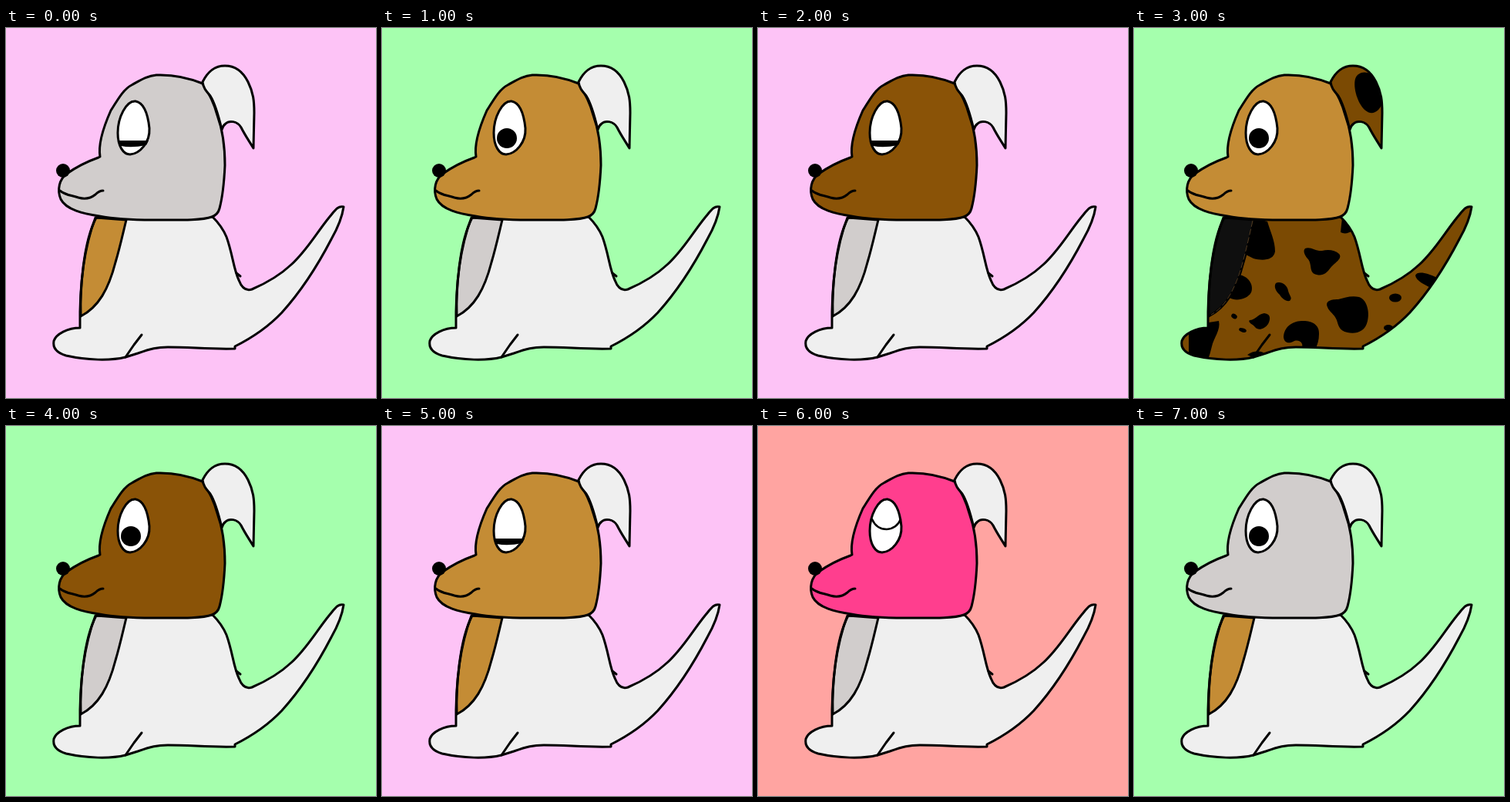
An HTML page for the animation above (8 s loop, 480 px wide and 480 px high).

```html
<!DOCTYPE html>
<html lang="en">
<head>
<meta charset="utf-8">
<title>Dog</title>
<style>
  html, body { margin: 0; width: 100%; height: 100%; overflow: hidden; }
  svg { display: block; width: 100vw; height: 100vh; }
  .line { fill: none; stroke: #000; stroke-width: 3; stroke-linecap: round; stroke-linejoin: round; }
</style>
</head>
<body>
<svg viewBox="0 0 480 480">
  <defs>
    <path id="bodyShape" d="M116 246C103 280 95 325 96 389C80 389 65 397 62 406C60 417 68 422 78 425C105 431 135 432 155 427L171 422C188 416 196 414 210 414C240 414 265 417 297 416L297 413C319 402 341 387 358 369C385 339 408 301 422 274C430 260 436 246 438 232C430 230 426 238 419 246C402 267 390 289 370 307C354 322 333 333 319 339C310 342 305 335 302 327C295 312 294 293 286 271C281 259 275 252 268 245Z"/>
    <path id="earShape" d="M255 70C261 58 269 49 284 49C299 49 308 58 314 70C321 84 322 95 322 110L321 156C315 146 310 139 305 129C300 120 289 120 285 124Q281 127 280 132C276 115 272 99 265 88C260 82 256 78 255 70Z"/>
    <clipPath id="bodyClip"><use href="#bodyShape"/></clipPath>
    <clipPath id="earClip"><use href="#earShape"/></clipPath>
  </defs>

  <rect id="back" width="480" height="480"/>

  <use id="body" href="#bodyShape"/>
  <g class="spots" clip-path="url(#bodyClip)">
    <path d="M150 245L173 251C177 265 183 276 183 290C181 302 166 302 155 299L141 292Z"/>
    <path d="M222 286C229 283 236 290 244 289C252 287 261 288 266 293C271 299 261 304 255 311C250 318 245 322 237 320C226 318 232 306 225 299C221 294 219 289 222 286Z"/>
    <path d="M251 362C247 353 258 352 265 352C274 350 281 347 292 349C302 352 306 368 303 380C300 395 287 397 277 395C266 393 265 385 263 379C260 371 253 368 251 362Z"/>
    <path d="M184 331C190 328 199 333 200 341C202 348 206 350 202 354C197 355 192 351 189 346C184 342 181 335 184 331Z"/>
    <path d="M135 320C147 321 156 332 152 343C147 352 132 355 124 350Z"/>
    <path d="M150 379C157 379 161 371 169 370C178 371 177 378 174 384C169 391 161 393 157 388C154 384 147 382 150 379Z"/>
    <path d="M194 401C195 387 205 381 217 380C229 379 241 384 240 397C240 405 238 411 235 417H217C221 410 216 404 208 406C201 410 195 409 194 401Z"/>
    <path d="M71 386L110 380C113 391 103 403 101 413Q99 422 96 430L71 424Z"/>
    <path d="M268 265L270 246L285 262Q275 269 268 265Z"/>
    <path d="M365 321C367 315 380 317 393 324L385 337C377 333 366 328 365 321Z"/>
    <ellipse cx="339" cy="350" rx="8" ry="5.5"/>
    <ellipse cx="330" cy="389" rx="6" ry="4"/>
    <ellipse cx="130" cy="374" rx="4" ry="3" transform="rotate(35 130 374)"/>
    <ellipse cx="141" cy="392" rx="5" ry="2.5" transform="rotate(18 141 392)"/>
    <path d="M147 424Q157 417 168 421L160 430Z"/>
  </g>
  <path id="bib" class="line" d="M117 246L156 249C152 265 148 284 142 304C133 339 120 362 97 374C96 340 100 278 117 246Z"/>
  <path class="spots" d="M154 250C150 268 146 286 141 304C132 338 119 361 100 372" fill="none" stroke="#654a29" stroke-width=".8" stroke-dasharray="8 3"/>
  <use href="#bodyShape" class="line"/>
  <path class="line" d="M155 427L166 411L176 398M299 318L304 322" stroke-width="2"/>

  <path id="head" class="line" d="M122 167C119 149 128 125 136 107C146 91 153 79 163 74C174 68 183 62 195 61C220 60 238 65 255 72C263 84 270 98 274 113C281 132 284 155 284 178C283 200 281 219 277 234Q275 242 267 245C254 250 220 249 190 249C163 249 137 247 121 244C101 241 78 236 71 222C66 210 69 196 79 189C93 179 106 173 120 168Z"/>
  <path class="line" d="M70 211C77 217 85 217 94 220C104 223 111 220 116 216Q121 211 126 211"/>
  <circle cx="74" cy="185" r="9"/>

  <use id="ear" href="#earShape"/>
  <path class="spots" clip-path="url(#earClip)" d="M287 66C290 57 301 55 308 61L318 76L322 98C317 110 308 114 299 106C290 97 284 78 287 66Z"/>
  <use href="#earShape" class="line"/>

  <path class="line" style="fill:#fff" d="M168 95C156 94 145 116 145 136C145 153 152 164 161 164C174 163 187 148 186 130C184 111 179 97 168 95Z"/>
  <circle id="openEye" cx="162" cy="143" r="13"/>
  <path id="sleepyEye" d="M146 146H185L182 152Q163 156 149 153Z"/>
  <path id="liftedLid" class="line" style="stroke-width:2.5" d="M148 121C152 130 158 134 167 134Q180 133 185 121"/>
</svg>
<script>
  const pink = '#fdc3f6', green = '#a5ffad', salmon = '#ffa4a1';
  const gray = '#d1cdcc', tan = '#c48c35', brown = '#8a5307', rose = '#ff3e8e';
  const white = '#efefef', coat = '#7b4a03', black = '#0f0f0f';
  const eyes = { [green]: 'openEye', [pink]: 'sleepyEye', [salmon]: 'liftedLid' };

  // Background, head, bib, body; one look per second
  const looks = [
    [pink, gray, tan, white],
    [green, tan, gray, white],
    [pink, brown, gray, white],
    [green, tan, black, coat],
    [green, brown, gray, white],
    [pink, tan, tan, white],
    [salmon, rose, gray, white],
    [green, gray, tan, white]
  ];
  const part = id => document.getElementById(id);
  const show = (el, on) => el.style.display = on ? '' : 'none';

  function draw(now) {
    const [back, head, bib, body] = looks[Math.floor(now / 1000) % looks.length];
    Object.entries({ back, head, bib, body, ear: body }).forEach(([id, color]) => part(id).style.fill = color);
    Object.values(eyes).forEach(id => show(part(id), id === eyes[back]));
    document.querySelectorAll('.spots').forEach(el => show(el, body === coat));
    requestAnimationFrame(draw);
  }
  draw(performance.now());
</script>
</body>
</html>
```
